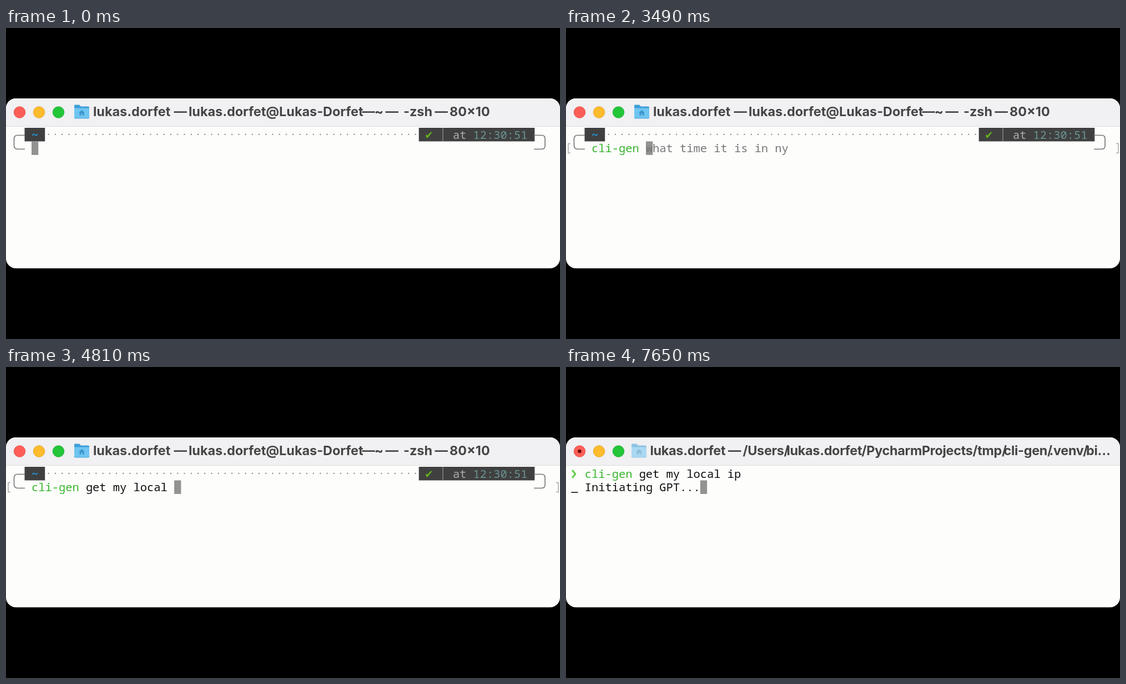
An HTML page for the animation above (7990 ms loop, 998 by 561 pixels).

```html
<!DOCTYPE html>
<html lang="en">
<head>
<meta charset="utf-8">
<title>Terminal</title>
<style>
  html, body { margin: 0; width: 100%; height: 100%; overflow: hidden; background: #000; }
  svg { display: block; width: 998px; height: 561px; }
  text { white-space: pre; }
  .mono { font: 400 20.4px "Noto Sans Mono", "DejaVu Sans Mono", monospace; fill: #0c0c0c; }
  .title { font: 700 23.4px Inter, "Liberation Sans", sans-serif; fill: #454545; }
  .tight { letter-spacing: -.3px; }
  .bad { fill: #c23621; font-weight: 700; }
  .good { fill: #38b52c; }
  .hint { fill: #767676; }
  .line { fill: none; stroke: #747474; stroke-width: 1.6; }
</style>
</head>
<body>
<svg viewBox="0 0 998 561">
  <rect width="998" height="561"/>
  <rect y="127" width="998" height="306.5" rx="18" fill="#fdfdfc"/>
  <path d="M0 177V145a18 18 0 0 1 18-18H980a18 18 0 0 1 18 18V177Z" fill="#f1f0f2"/>
  <path d="M0 177.5H998" stroke="#dcdbdd"/>

  <g stroke-width=".8">
    <circle cx="24.5" cy="152" r="10.3" fill="#fe5e57" stroke="#e24b43"/>
    <circle cx="59.5" cy="152" r="10.3" fill="#fdbb2d" stroke="#e0a023"/>
    <circle cx="94.5" cy="152" r="10.3" fill="#23c639" stroke="#1aab2c"/>
  </g>
  <circle id="dot" cx="24.5" cy="152" r="3.3" fill="#6e0a08"/>

  <g id="folder">
    <path d="M1.500 0H9l3 3H25a2 2 0 0 1 2 2V12H0V1.500A1.500 1.500 0 0 1 1.500 0Z" fill="#3f9fd8"/>
    <path d="M0 6H27V22.500a2 2 0 0 1-2 2H2a2 2 0 0 1-2-2Z" fill="#6fc5f1"/>
    <path d="M0 22.500a2 2 0 0 0 2 2H25a2 2 0 0 0 2-2" fill="none" stroke="#4aa7da"/>
    <path d="M13.500 9.500L19 14.500H17.500V19.500H14.800V16.300H12.200V19.500H9.500V14.500H8Z" fill="#3d96cb"/>
  </g>
  <g id="titles"></g>

  <g id="prompt">
    <rect x="33.500" y="180" width="36.700" height="24.500" fill="#404040"/>
    <rect x="743.700" y="180" width="208.600" height="24.500" fill="#404040"/>
    <path id="dots" d="M76.600 192H740" stroke="#858585" stroke-width="2.300" stroke-linecap="round" stroke-dasharray="0 12.240"/>
    <path class="line" d="M34 193.500H21Q14.500 193.500 14.500 200V212Q14.500 218.500 21 218.500H34M951 193.500H965Q971 193.500 971 199.500V212.500Q971 218.500 965 218.500H951"/>
    <path d="M787 180V204.500" stroke="#858585" stroke-width="1.500"/>
    <text class="mono" x="46" y="199.500" style="fill:#22a2f5;font-weight:700">~</text>
    <text x="754" y="199.500" fill="#62b01e" font-size="19" font-family="DejaVu Sans, sans-serif">✔</text>
    <text class="mono" x="805" y="199.500" style="fill:#adadad">at</text>
    <text class="mono" x="841.600" y="199.500" style="fill:#6a9492">12:30:51</text>
  </g>
  <path id="marks" d="M8 208.500H4V225.500H8M991 208.500H995V225.500H991" fill="none" stroke="#a6a6a6" stroke-width="1.500"/>
  <path id="arrow" d="M11.300 186L16.800 193L11.300 200" fill="none" stroke="#62d048" stroke-width="3"/>
  <rect id="cursor" width="12.240" height="24.500" fill="#929290"/>
  <text id="command" class="mono"><tspan id="head"></tspan><tspan id="args"></tspan><tspan id="hint" class="hint"></tspan></text>
  <g id="output" class="mono">
    <text id="spinner" x="9.300" y="224"></text>
    <text id="status" x="33.800" y="224"></text>
  </g>
</svg>
<script>
const LOOP = 7990, CELL = 12.24, LEFT = 9.3;
const USER = "lukas.dorfet", HOST = "Lukas-Dorfet";
const COMMAND = "cli-gen get my local ip";
const KEYS = [1460, 1540, 1640, 2280, 2490, 2880, 2960, 3390, 3600, 3700, 3830, 3980,
  4080, 4140, 4240, 4330, 4430, 4520, 4600, 4700, 4800, 5210, 5390];
const BUSY = [[1500, 1650], [3570, 3660], [3850, 4040], [4440, 4560], [4700, 4790]];
const ENTER = 5720, LAUNCH = 5770, STATUS = 5940;
const FLIP = ["_", "_", "_", "-", "`", "`", "'", "´", "-", "_", "_", "_"];
const FLIP_START = 6242, FLIP_STEP = 67;

const $ = id => document.getElementById(id);
const show = (el, on) => el.setAttribute("visibility", on ? "visible" : "hidden");

function addTitle(words, extra = "") {
  const g = document.createElementNS("http://www.w3.org/2000/svg", "g");
  g.setAttribute("class", "title " + extra);
  g.innerHTML = words.map(([x, s]) => `<text x="${x}" y="159.3">${s}</text>`).join("");
  $("titles").append(g);
  return g;
}

const base = dx => [[157, USER], [302.5, "—"], [329, `${USER}@${HOST}`], [641.5, "—"],
  [664, "~"], [683.5, "—"], [716, "-zsh"]].map(([x, s]) => [x + dx, s]);
const titles = {
  idle: addTitle([...base(0), [772.5, "—"], [799, "80×10"]]),
  busy: addTitle([...base(-5.5), [784, "-zsh"], [840, "—"], [867, "80×10"]]),
  run: addTitle([[151.5, USER], [292, "—"], [318.5, "/Users/"], [397.5, USER],
    [532.5, "/PycharmProjects/tmp/"], [788.5, "cli-gen/"], [870.5, ".venv/"], [937, "bi…"]], "tight")
};
titles.busy.insertAdjacentHTML("beforeend", '<path d="M776 147.500L768 152L776 156.500Z"/>');

function hintFor(n) {
  if (n === 1 || n === 2) return "clear".slice(n);
  return n >= 3 && n <= 8 ? "cli-gen what time it is in ny".slice(n) : "";
}

function draw(t) {
  const typed = KEYS.filter(k => k <= t).length;
  const entered = t >= ENTER, status = t >= STATUS;
  const mode = t >= LAUNCH ? "run" : BUSY.some(([a, b]) => t >= a && t < b) ? "busy" : "idle";

  for (const name in titles) show(titles[name], name === mode);
  show($("dot"), mode !== "idle");
  $("folder").setAttribute("transform", `translate(${mode === "idle" ? 123 : 118} 138.5)`);
  $("folder").setAttribute("opacity", mode === "idle" ? 1 : .55);

  show($("prompt"), !entered);
  show($("marks"), t >= 3010 && !entered);
  show($("arrow"), entered);
  show($("output"), status);

  $("command").setAttribute("x", LEFT + CELL * (entered ? 2 : 3));
  $("command").setAttribute("y", entered ? 199.5 : 224);
  $("head").textContent = COMMAND.slice(0, Math.min(typed, 7));
  $("head").setAttribute("class", typed < 7 ? "bad" : "good");
  $("args").textContent = COMMAND.slice(7, Math.max(typed, 7));
  $("hint").textContent = hintFor(typed);

  const column = status ? 19 : entered ? 0 : 3 + typed;
  $("cursor").setAttribute("x", LEFT + CELL * column);
  $("cursor").setAttribute("y", 204.5);

  const step = Math.max(0, Math.floor((t - FLIP_START) / FLIP_STEP));
  $("spinner").textContent = FLIP[step % FLIP.length];
  $("status").textContent = "Initiating GPT...";
}

const start = performance.now();
function tick() {
  draw((performance.now() - start) % LOOP);
  requestAnimationFrame(tick);
}
tick();
</script>
</body>
</html>
```
